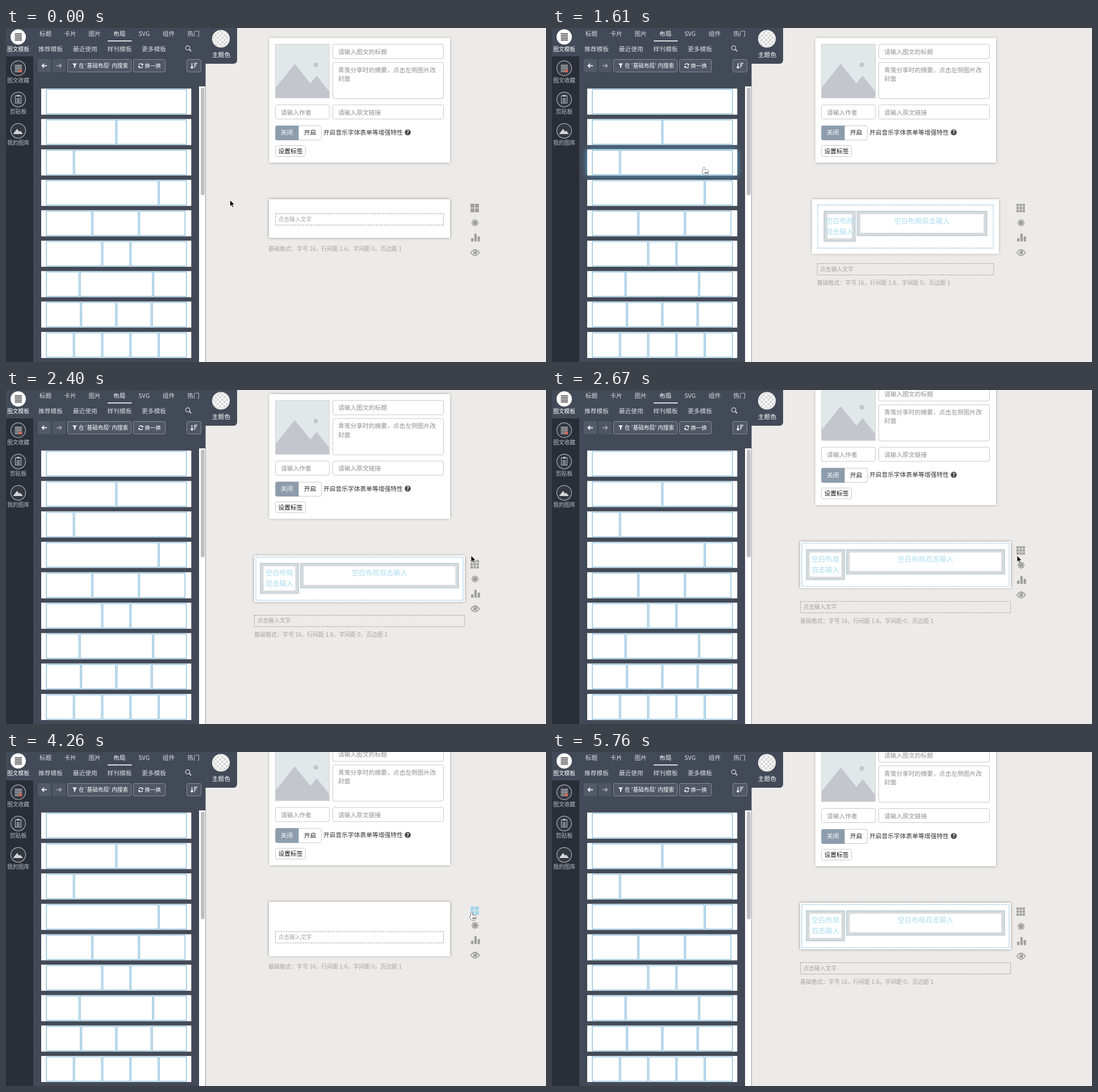
These frames come from a looping animation (951x589 px, 6570 ms). An HTML page with a canvas:

```html
<!DOCTYPE html>
<html lang="zh-CN">
<head>
<meta charset="utf-8">
<style>
html, body { margin: 0; width: 100%; height: 100%; overflow: hidden; background: #ecebea; }
canvas { display: block; }
</style>
</head>
<body>
<canvas id="stage" width="951" height="589"></canvas>
<script>
const ctx = document.getElementById('stage').getContext('2d');
const LOOP = 6570, STEP = 88.5;
const FONT = '"Noto Sans CJK SC", "Noto Sans CJK", "Noto Sans", sans-serif';
const PANEL = '#434a57', BLUE = '#82bbdb', GREY = '#9f9f9f', PALE = '#b9bcc2';

// Moments of the story, in ms
const INSERT = 1600, COLLAPSE = 3640, EXPAND = 4610, LEAVE = 5400, GONE = 5750;

const mix = (a, b, k) => a + (b - a) * k;
const ramp = (t, a, b) => Math.max(0, Math.min(1, (t - a) / (b - a)));
const ease = (t, a, b) => { const k = ramp(t, a, b); return k * k * (3 - 2 * k); };

// The pointer rests at a few places; each leg runs ahead vertically
const LEGS = [
  { from: 455, to: 1070, x: 267.5, y: 245.5 },
  { from: 1713, to: 2220, x: 819, y: 292 },
  { from: 2680, to: 2850, x: 820, y: 283 },
  { from: 5325, to: GONE, x: 941, y: 521 },
];

function pointerAt(t) {
  let x = 394.5, y = 303.5;
  for (const leg of LEGS) {
    const k = ease(t, leg.from, leg.to);
    x = mix(x, leg.x, k);
    y = mix(y, leg.y, 1 - (1 - k) ** 2.5);
  }
  return { x, y };
}

const scrollAt = t => 36 * ease(t, 2225, 2727) + 1.7 * (ramp(t, 4180, 4258) - ramp(t, 5060, 5230));
const glowAt = t => ramp(t, 720, 900) - ramp(t, 1784, 2200);

function fill(x, y, w, h, color) {
  ctx.fillStyle = color;
  ctx.fillRect(x, y, w, h);
}

function text(str, x, y, size, color, align = 'left', weight = 400) {
  ctx.font = `${weight} ${size}px ${FONT}`;
  ctx.textAlign = align;
  ctx.fillStyle = color;
  ctx.fillText(str, x, y + size * .36);
}

function round(x, y, w, h, r, bg, border) {
  ctx.beginPath();
  ctx.roundRect(x, y, w, h, r);
  if (bg) { ctx.fillStyle = bg; ctx.fill(); }
  if (border) { ctx.strokeStyle = border; ctx.lineWidth = 1; ctx.stroke(); }
}

function disc(x, y, r, color, border) {
  ctx.beginPath();
  ctx.arc(x, y, r, 0, 7);
  if (color) { ctx.fillStyle = color; ctx.fill(); }
  if (border) { ctx.strokeStyle = border; ctx.lineWidth = 1.2; ctx.stroke(); }
}

function poly(points, color) {
  ctx.beginPath();
  points.forEach(([x, y]) => ctx.lineTo(x, y));
  ctx.closePath();
  ctx.fillStyle = color;
  ctx.fill();
}

function line(color, width, ...points) {
  ctx.strokeStyle = color;
  ctx.lineWidth = width;
  ctx.beginPath();
  points.forEach(([x, y]) => ctx.lineTo(x, y));
  ctx.stroke();
}

function frame(x, y, w, h, color, dash = [], width = 1) {
  ctx.save();
  ctx.setLineDash(dash);
  ctx.lineWidth = width;
  ctx.strokeStyle = color;
  ctx.strokeRect(x, y, w, h);
  ctx.restore();
}

function sheet(x, y, w, h) {
  ctx.save();
  ctx.shadowColor = 'rgba(0,0,0,.38)';
  ctx.shadowBlur = 5;
  fill(x, y, w, h, '#fff');
  ctx.restore();
}

function peak(x, y, base, color) {
  const half = base - y;
  poly([[x - half * .8, base], [x, y], [x + half * .8, base]], color);
}

function form() {
  sheet(463.5, 17.5, 318.5, 220);
  ctx.save();
  ctx.beginPath();
  ctx.rect(474, 28, 96, 96);
  ctx.clip();
  fill(474, 28, 96, 96, '#e2e8ea');
  peak(508.5, 63, 124, '#c3c7cd');
  peak(547, 84, 124, '#c3c7cd');
  disc(545.5, 65, 4, '#c3c7cd');
  ctx.restore();
  frame(474.5, 28.5, 95, 95, '#cfd4d7');

  const input = (x, y, w, h, ...hints) => {
    round(x, y, w, h, 3, '#fff', '#c8c8c8');
    hints.forEach((s, i) => text(s, x + 9.5, y + 13.2 + i * 15.5, 10.75, '#8f8f8f'));
  };
  input(575.5, 28.5, 195, 25.5, '请输入图文的标题');
  input(575.5, 60.5, 195, 64, '青笺分享时的摘要，点击左侧图片改', '封面');
  input(474.5, 135.5, 95, 25, '请输入作者');
  input(575.5, 135.5, 195, 25, '请输入原文链接');

  round(474.5, 172.5, 81, 25, 3, '#fff', '#c8c8c8');
  round(474.5, 172, 41, 26, [3, 0, 0, 3], '#8e9dad');
  text('关闭', 494.5, 184.5, 10.75, '#fff', 'center');
  text('开启', 535.5, 184.5, 10.75, '#222', 'center');
  text('开启音乐字体表单等增强特性', 559, 184, 10.75, '#333');
  disc(707.5, 184, 5.3, '#4a4a4a');
  text('?', 707.5, 184, 9, '#fff', 'center', 700);
  round(474.5, 207.5, 53, 19, 3, '#fff', '#c8c8c8');
  text('设置标签', 501, 217, 10.75, '#111', 'center');
}

function cell(x, y, w, h, label) {
  fill(x, y, w, h, '#d9dbdc');
  fill(x + 6.5, y + 6, w - 13, h - 12, '#fff');
  frame(x + 1.5, y + 1.5, w - 3, h - 3, BLUE, [1.3, 1.5]);
  frame(x + 6, y + 5.5, w - 12, h - 11, '#c5ced3', [1.3, 1.5]);
  label.forEach((s, i) => text(s, x + w / 2, y + 18 + i * 19, 12.25, '#a9dcf0', 'center'));
}

// Everything in the article is centred, so a left edge also gives the width
const across = left => 1245 - 2 * left;

function article(t) {
  const top = 302, gridded = (t >= INSERT && t < COLLAPSE) || t >= EXPAND;
  let left = 463, h = 68, dashX = 474, dashY = 25, labelX = 462, labelY = 87;
  if (gridded) {
    const q = 1 - (t < COLLAPSE ? ramp(t, 1516, 1959) : ramp(t, 4525, 4968));
    const tall = t >= EXPAND && q > .3;
    left = mix(437, 463, q);
    h = 82 + 18 * q + (tall ? 19 : 0);
    dashX = labelX = left + 11 * q;
    dashY = h + 23 - 8 * q;
    labelY = dashY + 34.7;
    sheet(left, top, across(left), h);
    const edge = 3 + 9 * q, x = left + 10 + 13 * q, y = top + 13 + 9 * q, w = across(x);
    frame(left + edge, top + edge, across(left + edge), h - 2 * edge, '#79b5da', [1.4, 1.6], 1.4);
    cell(x, y, w * .2 - 1, tall ? 74 : 55, tall ? ['空白布', '局双击', '输入'] : ['空白布局', '双击输入']);
    cell(x + w * .2 + .5, y, w * .8 - .5, 45, ['空白布局双击输入']);
  } else {
    if (t >= COLLAPSE) {
      const k = ramp(t, COLLAPSE, COLLAPSE + 350);
      left = mix(437.5, 463, k);
      h = mix(55, 96, k);
      dashX = mix(426, 474, k);
      dashY = mix(79, 52, k);
      labelX = mix(426, 462, k);
      labelY = 114.5;
    }
    sheet(left, top, across(left), h);
  }
  frame(dashX + .5, top + dashY + .5, across(dashX) - 1, 20, '#a0a0a0', [3, 1.6]);
  text('点击输入文字', dashX + 5.5, top + dashY + 10, 9.8, '#a3a3a3');
  text('基础格式：字号 16，行间距 1.6，字间距 0，页边距 1', labelX, top + labelY, 10, '#a3a3a3');
  tools(gridded ? 3 : 2, t >= 2750 && t < LEAVE);
}

function tools(n, hot) {
  const pitch = 16 / n;
  for (let i = 0; i < n * n; i++)
    fill(818 + i % n * pitch, 310 + Math.floor(i / n) * pitch, pitch - 1.1, pitch - 1.1, hot ? '#a6d6e9' : GREY);
  for (let i = 0; i < 4; i++) {
    const a = i * Math.PI / 4, x = 6.4 * Math.cos(a), y = 6.4 * Math.sin(a);
    line(GREY, 2.3, [826 - x, 343.5 - y], [826 + x, 343.5 + y]);
  }
  [6, 14, 9].forEach((h, i) => round(819 + i * 5.8, 376.5 - h, 4.2, h, 1, GREY));
  ctx.beginPath();
  ctx.moveTo(818.5, 396);
  ctx.quadraticCurveTo(826, 385.5, 833.8, 396);
  ctx.quadraticCurveTo(826, 406.5, 818.5, 396);
  ctx.strokeStyle = GREY;
  ctx.lineWidth = 1.7;
  ctx.stroke();
  disc(826.2, 395.5, 3.6, GREY);
  disc(825, 394.2, 1.2, '#dedede');
}

function textLines(x, y, w, n, color) {
  for (let i = 0; i < n; i++) fill(x, y + i * 2.8, w, 1.4, color);
}

function sidebar() {
  fill(0, 0, 48, 589, '#2a2e37');
  fill(0, 0, 48, 50, PANEL);
  ['图文模板', '图文收藏', '剪贴板', '我的图库'].forEach((s, i) => {
    const y = 15.7 + i * 55.2;
    i ? disc(21.5, y, 13, '#343841', '#a9acb2') : disc(21.5, y, 13.5, '#fff');
    text(s, 21.5, y + 21.3, 9.8, i ? PALE : '#fff', 'center', i ? 400 : 500);
  });
  textLines(15.5, 9.5, 12.5, 5, '#333');
  textLines(15.5, 65, 12.5, 5, '#c4c6ca');
  poly(Array.from({ length: 10 }, (_, i) => {
    const a = i * Math.PI / 5 - Math.PI / 2, r = i % 2 ? 2 : 4.3;
    return [25.5 + r * Math.cos(a), 75.5 + r * Math.sin(a)];
  }), '#d7664f');
  frame(16.5, 119.5, 10, 13, PALE);
  fill(19, 118, 5, 3, PALE);
  textLines(18.5, 124, 6, 3, PALE);
  peak(19.5, 178, 187, '#d3d5d8');
  peak(25, 181, 187, '#d3d5d8');
}

function toolbar() {
  const tab = '#d9dbdf';
  ['标题', '卡片', '图片', '布局', 'SVG', '组件', '热门'].forEach((s, i) =>
    text(s, 69.5 + i * 43.4, 10, 10.75, i === 3 ? '#fff' : tab, 'center', i === 3 ? 500 : 400));
  fill(179, 22, 42.5, 1.6, '#fff');
  ['推荐模板', '最近使用', '样刊模板', '更多模板'].forEach((s, i) =>
    text(s, 78.5 + i * 60.7, 37.5, 10.75, tab, 'center'));
  disc(320, 35, 3.7, null, tab);
  line(tab, 1.8, [322.8, 37.8], [326, 41]);

  const button = (x, w) => round(x, 55.5, w, 22, 2, '#505765', '#858b95');
  const arrowIcon = (x, dir, color) => {
    line(color, 1.7, [x - 4 * dir, 66.5], [x + 4 * dir, 66.5]);
    line(color, 1.7, [x + dir, 63], [x + 4.5 * dir, 66.5], [x + dir, 70]);
  };
  round(56, 55, 23, 23, 2, '#535a67');
  round(82, 55, 23, 23, 2, '#4f5663');
  arrowIcon(68, -1, '#fff');
  arrowIcon(93, 1, '#a5a9b1');

  button(108.5, 112);
  poly([[117, 62.5], [125, 62.5], [121, 67.5]], '#fff');
  fill(120, 65, 2, 5, '#fff');
  text("在 '基础布局' 内搜索", 128, 66.5, 9.7, '#fff');

  button(224.5, 56);
  for (const [dir, turn] of [[1, 3.54], [-1, .4]]) {
    ctx.beginPath();
    ctx.arc(237.3, 66.5, 3.6, turn, turn + 2.3);
    ctx.strokeStyle = '#fff';
    ctx.lineWidth = 1.3;
    ctx.stroke();
    const x = 237.3 + 4.2 * dir, y = 66.5 - 4 * dir;
    poly([[x, y], [x, y + 3.5 * dir], [x - 3.5 * dir, y + 3.5 * dir]], '#fff');
  }
  text('换一换', 258.5, 66.5, 9.5, '#fff', 'center');

  button(318.5, 25);
  line('#fff', 1.4, [327.5, 62], [327.5, 70.5]);
  line('#fff', 1.4, [325.3, 68.3], [327.5, 71], [329.7, 68.3]);
  for (let i = 0; i < 4; i++) fill(331, 61.5 + i * 2.6, 6 - i * 1.5, 1.3, '#fff');
}

function theme() {
  round(345, -8, 62, 71, 6, PANEL);
  ctx.save();
  ctx.beginPath();
  ctx.arc(378.5, 19, 15, 0, 7);
  ctx.clip();
  fill(363, 3, 32, 32, '#fff');
  for (let i = 0; i < 64; i++)
    if ((i + (i >> 3)) % 2) fill(363.5 + i % 8 * 3.9, 3.5 + (i >> 3) * 3.9, 3.9, 3.9, '#d4d4d4');
  ctx.restore();
  disc(378.5, 19, 15, null, '#f3f3f3');
  text('主题色', 379, 47.5, 10.75, '#fff', 'center');
}

function rows(glow) {
  const even = n => Array(n).fill(100 / n);
  const splits = [even(1), even(2), [20, 80], [80, 20], [33, 33, 33], [40, 20, 40], [24, 52, 24], even(4), even(5)];
  splits.forEach((parts, i) => {
    const y = 106.8 + i * 53.65;
    ctx.save();
    if (i === 2 && glow > 0) {
      ctx.shadowColor = `rgba(91,190,240,${glow * .9})`;
      ctx.shadowBlur = 11;
    }
    fill(62, y, 264.3, 46, '#fff');
    ctx.restore();
    let x = 71;
    for (const part of parts) {
      const w = part * 2.49;
      frame(x, y + 1.6, w - 2.3, 43, '#8cc1de', [], 1.4);
      x += w;
    }
  });
}

function panel(glow) {
  fill(48, 0, 303.5, 589, PANEL);
  fill(340, 103, 11, 486, '#fff');
  round(343, 105, 6.8, 190, 3.4, '#bfbfc1');
  theme();
  toolbar();
  rows(glow);
  sidebar();
}

function arrow() {
  const shape = [[0, 0], [0, 11.2], [2.6, 8.9], [4.4, 12.8], [6.2, 12], [4.5, 8.2], [8, 8], [0, 0]];
  poly(shape, '#000');
  line('#fff', .8, ...shape);
}

function hand() {
  const parts = (bg, border) => {
    round(-1.3, 0, 2.7, 9, 1.3, bg, border);
    round(-3.2, 6.5, 4, 4, 1.8, bg, border);
    round(-1.3, 4.8, 9, 8.4, 2.5, bg, border);
  };
  parts(null, '#111');
  parts('#fff');
  for (let x = 2; x < 7; x += 2) line('#111', 1, [x, 8.8], [x, 11.4]);
}

function pointer(t) {
  if (t >= GONE) return;
  const { x, y } = pointerAt(t);
  ctx.save();
  ctx.translate(x, y);
  const overLink = x < 326 || (t >= 3000 && t < LEAVE);
  overLink ? hand() : arrow();
  ctx.restore();
}

function draw(now) {
  const t = Math.floor(now % LOOP / STEP) * STEP + 12;
  fill(0, 0, 951, 589, '#ecebea');
  ctx.save();
  ctx.translate(0, -scrollAt(t));
  form();
  article(t);
  ctx.restore();
  panel(glowAt(t));
  pointer(t);
}

let start;
function tick(now) {
  start ??= now;
  draw(now - start);
  requestAnimationFrame(tick);
}
draw(0);
requestAnimationFrame(tick);
</script>
</body>
</html>
```
